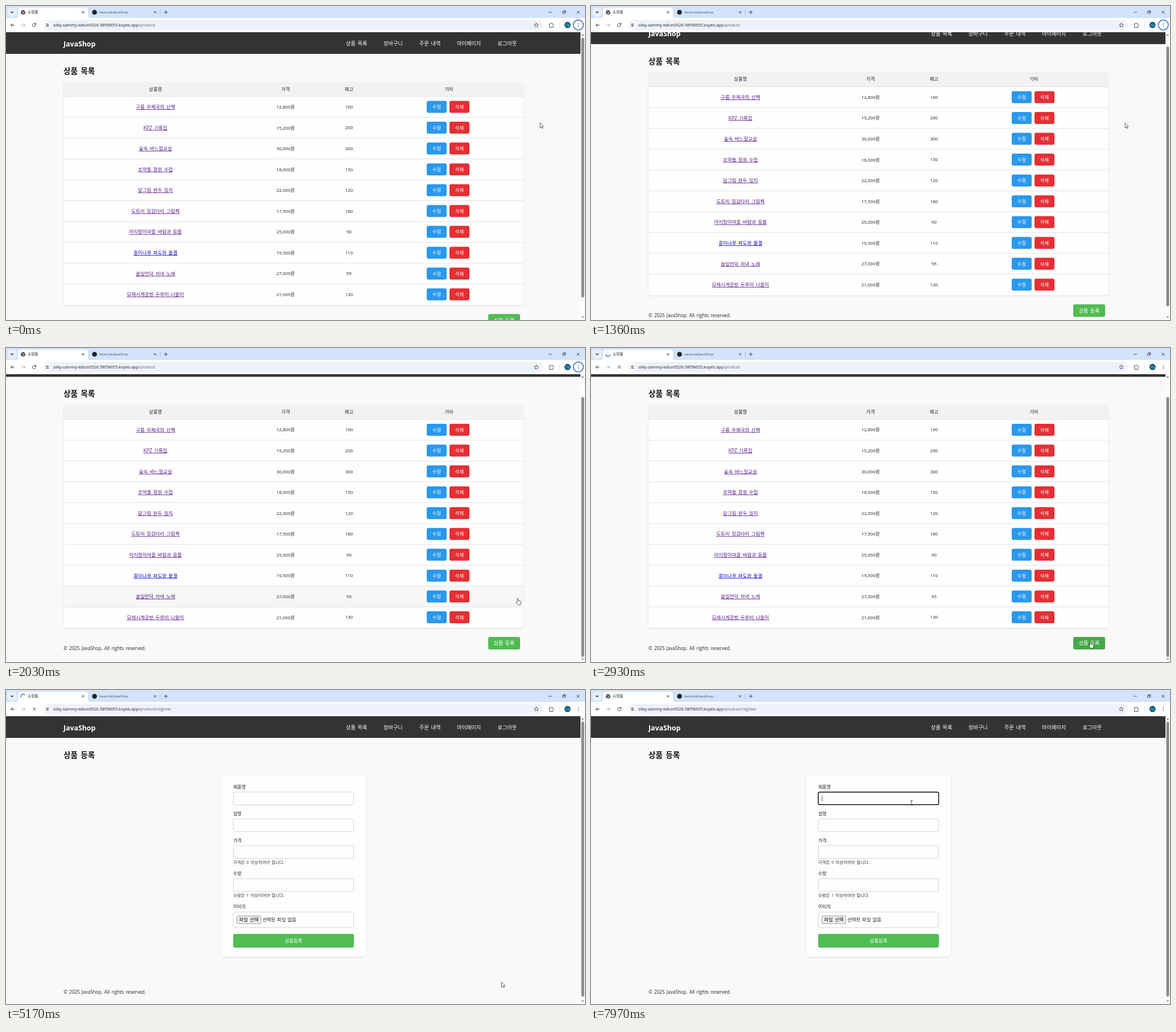
These frames come from a looping animation (1017x551 px, 8000 ms). An HTML page:

```html
<!DOCTYPE html>
<html lang="ko">
<head>
<meta charset="utf-8">
<title>쇼핑몰</title>
<style>
html, body { margin: 0; width: 100%; height: 100%; overflow: hidden; background: #f9f9fa; }
svg { display: block; width: 100%; height: 100%; }
text { font-family: 'Open Sans', 'Noto Sans CJK KR', 'Noto Sans CJK', sans-serif; word-spacing: .14em; white-space: pre; }
.line { fill: none; stroke-linecap: round; stroke-linejoin: round; }
</style>
</head>
<body>
<svg id="stage" viewBox="0 0 1017 551" preserveAspectRatio="none"></svg>
<script>
const LOOP = 8000;
const SCROLL_MAX = 33.5;
const CLICK = 2450, COMMIT = 5050, LOADED = 5300, FOCUS = 6800;
const ROW = 36.56, ROW_TOP = 158.7;

const rows = [
  ['구름 우체국의 산책', '12,800', 100],
  ['KPZ 기록집', '15,200', 200],
  ['숲속 바느질교실', '30,000', 300],
  ['조약돌 정원 수첩', '18,000', 150],
  ['달그림 완두 일지', '22,000', 120],
  ['도토리 징검다리 그림책', '17,500', 180],
  ['아지랑이마을 바람과 등불', '25,000', 90],
  ['종이나루 파도와 물결', '19,500', 110],
  ['솔잎언덕 저녁 노래', '27,000', 95],
  ['모래시계공방 두루미 나들이', '21,000', 130]
];

// y is the vertical middle of the text
const text = (x, y, size, str, more = '') =>
  `<text x="${x}" y="${y + size * .37}" font-size="${size}" ${more}>${str}</text>`;
const mid = (x, y, size, str, more = '') => text(x, y, size, str, 'text-anchor="middle" ' + more);
const rect = (x, y, w, h, fill, r = 0, more = '') =>
  `<rect x="${x}" y="${y}" width="${w}" height="${h}" rx="${r}" fill="${fill}" ${more}/>`;
const line = (d, color = '#333', width = 1, more = '') =>
  `<path class="line" d="${d}" stroke="${color}" stroke-width="${width}" ${more}/>`;
const circle = (x, y, r, fill, more = '') =>
  `<circle cx="${x}" cy="${y}" r="${r}" fill="${fill}" ${more}/>`;
const cross = (x, y, r, color, width) =>
  line(`M${x - r} ${y - r}l${2 * r} ${2 * r}m0 ${-2 * r}l${-2 * r} ${2 * r}`, color, width);
const button = (x, y, w, h, fill, label, size = 8.47, id = '') =>
  rect(x, y, w, h, fill, 3, id) + mid(x + w / 2, y + h / 2, size, label, 'fill="#fff"');

function siteHead(title) {
  const nav = [[597, '상품 목록'], [663, '장바구니'], [726, '주문 내역'], [792, '마이페이지'], [863.5, '로그아웃']];
  return rect(0, 46, 1009, 38, '#333') +
    text(101, 66, 12.3, 'JavaShop', 'fill="#fff" font-weight="700"') +
    nav.map(([x, s]) => text(x, 65.5, 9.2, s, 'fill="#fff"')).join('') +
    text(101, 114, 13.5, title, 'fill="#111" font-weight="700"');
}

const footer = y => text(101, y, 8.15, '© 2025 JavaShop. All rights reserved.', 'fill="#222"');

function listPage() {
  const heads = [[262.5, '상품명'], [491, '가격'], [602.5, '재고'], [778, '기타']];
  let s = siteHead('상품 목록') +
    rect(101, 133, 807.5, 391.3, '#fefefe', 4, 'filter="url(#shadow)"') +
    '<path d="M101 158.5V137a4 4 0 0 1 4-4H904.5a4 4 0 0 1 4 4V158.5z" fill="#f2f2f3"/>' +
    rect(101, 0, 807.5, ROW, '#f6f6f7', 0, 'id="hover"') +
    heads.map(([x, t]) => mid(x, 145.5, 8.3, t, 'fill="#222" font-weight="500"')).join('');
  rows.forEach(([name, price, stock], i) => {
    const y = 177 + i * ROW;
    const color = i === 7 ? '#0d00d8' : '#551a8b';
    s += line(`M101 ${ROW_TOP + i * ROW}H908.5`, '#dedee2', .8) +
      mid(262.5, y, 8.47, name, `fill="${color}" text-decoration="underline"`) +
      mid(491, y, 8, price + '원', 'fill="#222"') +
      mid(602.5, y, 7.9, stock, 'fill="#222"') +
      button(739, y - 10.5, 35, 21, '#2998ed', '수정') +
      button(779, y - 10.5, 35, 21, '#e52f33', '삭제');
  });
  return s + button(847, 540.5, 56, 22, '#4fbc52', '상품 등록', 9, 'id="add"') + footer(560);
}

function formPage() {
  const fields = [['제품명', 170, 179], ['설명', 217, 226], ['가격', 264, 273], ['수량', 322.5, 331.2], ['이미지', 380.5, 389.7]];
  let s = siteHead('상품 등록') + rect(378, 149, 254, 319, '#fdfdfd', 5, 'filter="url(#shadow)"');
  fields.forEach(([label, y, top], i) => {
    s += text(399, y, 8, label, 'fill="#222" font-weight="500"') +
      rect(399.3, top, 211.2, i === 4 ? 27 : 22.5, '#fdfdfd', 2.5, `stroke="#ccc" stroke-width=".8"`);
  });
  return s +
    text(399, 302, 7.4, '가격은 0 이상이어야 합니다.', 'fill="#333"') +
    text(399, 360.5, 7.4, '수량은 1 이상이어야 합니다.', 'fill="#333"') +
    rect(405.7, 396.5, 42, 13.5, '#efefef', 1.5, 'stroke="#777" stroke-width=".7"') +
    mid(426.7, 403.3, 8.4, '파일 선택', 'fill="#111"') +
    text(450.5, 403.3, 8.2, '선택된 파일 없음', 'fill="#222"') +
    button(399, 428, 212, 24, '#50bd54', '상품등록') +
    `<g id="focus">${rect(399.2, 179.2, 211.4, 22, '#fff', 2.5, 'stroke="#111" stroke-width="1.5"')}</g>` +
    line('M406 185.5V194.5', '#111', .7, 'id="caret"') + footer(530);
}

function browser() {
  const dark = '#3c4043';
  return rect(0, 0, 1017, 22, '#d3e3fd') + rect(0, 21, 1017, 25, '#fff') +
    '<path d="M16 21.5q5 0 5-5V8q0-5 5-5H139q5 0 5 5v8.500q0 5 5 5z" fill="#fff"/>' +
    rect(2.500, 3, 16, 16, '#e8f0fe', 5) + line('M8.700 10l2 2 2-2', '#222', 1.1) +
    `<g id="globe">${circle(30, 11, 4, '#4a4d51')}${line('M27 9.500q2-1 2.500.5t2 1.500M29 14q0-2 2-2M31.500 7.800l1.500 2', '#fff', .8)}</g>` +
    '<circle id="spin" class="line" cx="30" cy="11" r="3.8" stroke="#1a56d6" stroke-width="1.2" pathLength="360" stroke-dasharray="165 195"/>' +
    text(38, 11, 6.7, '쇼핑몰', 'fill="#222"') + cross(135.5, 11, 1.8, '#222', .9) +
    circle(155.500, 11, 4.300, '#1f2328') + text(164, 11, 6, 'lwunrob/JavaShop', 'fill="#444746"') +
    cross(262, 11, 1.8, '#333', .8) + line('M271 7V15', '#9db4d6', .8) +
    line('M278 11h5.600m-2.800-2.800v5.600', '#333', .9) +
    line('M953.500 11h4.800', '#222', .8) +
    line('M978 9.500h3.500v3.500h-3.500zM979.300 9.300v-1.100h3.500v3.500h-1.100', '#222', .7) + cross(1005, 11, 2.2, '#222', .8) +
    line('M14.500 33.500H8.700m2.600-2.700l-2.700 2.700 2.700 2.700', dark, 1) +
    line('M27.500 33.500h5.800m-2.600-2.700l2.700 2.700-2.700 2.700', '#aaaeb3', 1) +
    `<g id="reload">${line('M52 31.700a3 3 0 1 0 .4 2.700M52.600 30v2.300h-2.300', dark, 1)}</g>` +
    `<g id="stop">${cross(49.700, 33.500, 2.3, dark, 1)}</g>` +
    rect(65, 24.500, 878, 18, '#edf2fa', 9) + circle(72.500, 33.500, 6, '#fff') +
    line('M70 32h1.500m2.200 0h1.800M70 35.200h1.800m2.200 0h1.500', dark, .9) +
    circle(72.600, 32, 1, 'none', `stroke="${dark}" stroke-width=".8"`) +
    circle(72.900, 35.200, 1, 'none', `stroke="${dark}" stroke-width=".8"`) +
    text(83, 33.3, 7.25, 'silky-sammy-kdlun0526-58f58655.koyeb.app<tspan id="path" fill="#5f6368"></tspan>', 'fill="#222"') +
    line('M931.500 29.800l1.100 2.400 2.600.3-1.900 1.800.5 2.600-2.300-1.300-2.300 1.300.5-2.600-1.900-1.800 2.600-.3z', dark, .8) +
    line('M954.500 31.200h2a1.200 1.200 0 0 1 2.400 0h2v2a1.200 1.200 0 0 1 0 2.300v2h-6.400v-2a1.200 1.200 0 0 0 0-2.300z', dark, .9) +
    line('M972.500 29V38', '#c9dcf8', .8) +
    circle(986.300, 33.300, 5.500, '#0b5a80') + mid(986.3, 33.2, 4.2, '도담', 'fill="#e4f1f5"') +
    circle(1005.300, 33.300, 8.800, '#fff', 'id="ring" stroke="#1757c9" stroke-width="1.300"') +
    [30.800, 33.400, 36].map(y => circle(1005.300, y, .75, dark)).join('');
}

const scrollbar = rect(1009, 46, 8, 505, '#fcfcfc') +
  '<path d="M1010.800 52l2.200-2.800 2.200 2.800zM1010.800 544.800l2.200 2.800 2.200-2.800z" fill="#777"/>' +
  rect(1010.500, 0, 5, 456, '#8a8a8c', 2.500, 'id="thumb"');

const pointers =
  '<path id="arrow" d="M0 0V8.700L2 6.900 3.400 9.900 4.900 9.200 3.600 6.300H6.200z" fill="#fff" stroke="#222" stroke-width=".7"/>' +
  '<path id="hand" d="M-1 1q1-1.700 2 0V4.300L4.200 5q1.300.4 1.200 1.700L4.900 9.700 4.200 11.800H.2L-3.100 7.500Q-2.600 6-1 7.400z" fill="#fff" stroke="#222" stroke-width=".75" stroke-linejoin="round"/>' +
  line('M-1.800-4.200Q0-4.200 0-3.200Q0-4.200 1.800-4.200M0-3.500V3.500M-1.800 4.200Q0 4.200 0 3.200Q0 4.200 1.800 4.200', '#222', .8, 'id="beam"');

document.getElementById('stage').innerHTML =
  `<defs><filter id="shadow" x="-5%" y="-5%" width="110%" height="112%">
    <feDropShadow dx="0" dy="1.2" stdDeviation="1.800" flood-color="#223" flood-opacity=".11"/></filter></defs>` +
  rect(0, 0, 1017, 551, '#f9f9fa') +
  `<g id="list">${listPage()}</g><g id="form">${formPage()}</g>` +
  scrollbar + browser() + `<g id="pointer">${pointers}</g>`;

const $ = id => document.getElementById(id);
const show = (id, on) => $(id).setAttribute('display', on ? 'inline' : 'none');
const set = (id, name, value) => $(id).setAttribute(name, value);
const ease = p => p * p * (3 - 2 * p);
const ramp = (t, a, b) => ease(Math.min(1, Math.max(0, (t - a) / (b - a))));

// time, x, y of the pointer's hot spot
const track = [
  [0, 938, 205], [1500, 938, 205], [2030, 899, 439], [2350, 877.5, 515],
  [3000, 877.5, 515], [4500, 870.5, 512.5], [5400, 870.5, 512.5],
  [6000, 602, 239.5], [6250, 602, 239.5], [6700, 563, 198], [LOOP, 563, 198]
];

function pointerAt(t) {
  const i = Math.max(1, track.findIndex(k => k[0] > t));
  const [a, b] = [track[i - 1], track[i]];
  const p = ramp(t, a[0], b[0]);
  return [a[1] + (b[1] - a[1]) * p, a[2] + (b[2] - a[2]) * p];
}

const inside = (x, y, l, t, r, b) => x >= l && x <= r && y >= t && y <= b;

function draw(t) {
  const onForm = t >= COMMIT;
  const loading = t >= CLICK && t < LOADED;
  const scroll = onForm ? 0 : SCROLL_MAX * ramp(t, 1290, 1430);
  const [x, y] = pointerAt(t);
  const py = y + scroll;

  show('list', !onForm);
  show('form', onForm);
  set('list', 'transform', `translate(0 ${-scroll})`);
  set('thumb', 'y', 55.5 + scroll / SCROLL_MAX * 30.5);
  set('thumb', 'height', onForm ? 482.5 : 456);
  $('path').textContent = onForm ? '/product/register' : '/product';

  const row = Math.floor((py - ROW_TOP) / ROW);
  const onRow = !onForm && row >= 0 && row < rows.length && x > 101 && x < 908.5;
  const onAdd = !onForm && inside(x, py, 847, 540.5, 903, 562.5);
  show('hover', onRow);
  if (onRow) set('hover', 'y', ROW_TOP + row * ROW);
  set('add', 'fill', onAdd ? '#46a84a' : '#4fbc52');

  const onField = onForm && [179, 226, 273, 331].some(top => inside(x, y, 399, top, 611, top + 23));
  const onSubmit = onForm && inside(x, y, 399, 428, 611, 452);
  const hand = onRow || onAdd || onSubmit;
  show('hand', hand);
  show('beam', onField);
  show('arrow', !hand && !onField);
  set('pointer', 'transform', `translate(${x} ${y})`);

  show('globe', !loading);
  show('spin', loading);
  set('spin', 'transform', `rotate(${7.5 + (t - 2930) * 630 / 1640} 30 11)`);
  show('reload', !loading);
  show('stop', loading);
  set('ring', 'stroke', t < CLICK ? '#1757c9' : 'none');

  show('focus', t >= FOCUS);
  show('caret', t >= FOCUS && (t - FOCUS) % 1000 < 500);
}

const start = performance.now();
function tick() {
  draw((performance.now() - start) % LOOP);
  requestAnimationFrame(tick);
}
tick();
</script>
</body>
</html>
```
